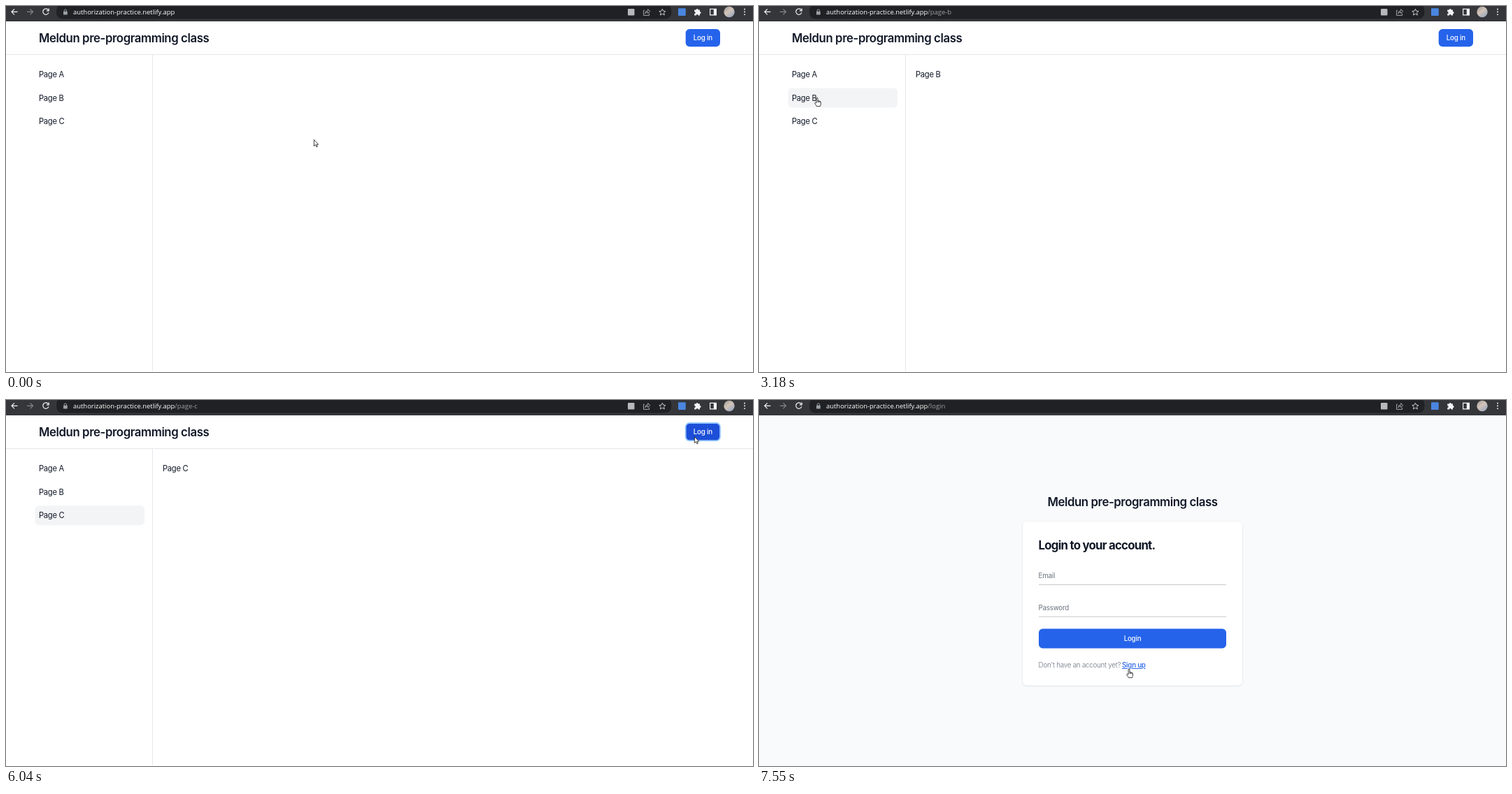
Write an HTML page that moves like this. It is 1068 px wide and 524 px high and loops after 8000 ms.

```html
<!DOCTYPE html>
<html lang="en">
<head>
<meta charset="utf-8">
<title>Login demo</title>
<style>
  html, body { margin: 0; width: 100%; height: 100%; overflow: hidden; background: #fff; }
  svg { display: block; width: 100vw; height: 100vh; }
  text { font: 9.8px Inter, sans-serif; font-optical-sizing: none; letter-spacing: -.025em; fill: #111827; }
  .url { font: 9.45px "Open Sans", sans-serif; letter-spacing: 0; fill: #fff; }
  .title { font-size: 16.8px; font-weight: 600; }
  .head { font-size: 16.8px; font-weight: 700; letter-spacing: -.045em; }
  .page { font-size: 11.2px; }
  .label { font-weight: 500; fill: #fff; text-anchor: middle; }
  .soft { fill: #6b7280; }
  .link { font-weight: 500; fill: #2563eb; }
  .icons { fill: none; stroke: #f1f3f4; stroke-width: 1.2; }
</style>
</head>
<body>
<svg viewBox="0 0 1068 524">
  <defs>
    <linearGradient id="photo" x1="0" y1="0" x2=".7" y2="1">
      <stop offset="0" stop-color="#9a9694"/>
      <stop offset=".5" stop-color="#d3c4b8"/>
      <stop offset="1" stop-color="#9da9c0"/>
    </linearGradient>
    <filter id="shadow" x="-5%" y="-5%" width="110%" height="112%">
      <feDropShadow dx="0" dy=".7" stdDeviation=".9" flood-opacity=".15"/>
    </filter>
  </defs>

  <g id="home">
    <rect width="1068" height="524" fill="#fff"/>
    <path d="M0 69.5H1068M209.5 70V523" stroke="#e5e7eb"/>
    <text class="title" x="47" y="52">Meldun pre-programming class</text>
    <g id="menu"></g>
    <text class="page" id="content" x="224" y="102"></text>
    <rect id="login" x="971.7" y="33" width="49.3" height="25.2" rx="5.6"/>
    <text class="label" x="996.3" y="49.2">Log in</text>
  </g>

  <g id="form">
    <rect width="1068" height="524" fill="#f8fafc"/>
    <text class="title" x="534" y="152.4" text-anchor="middle">Meldun pre-programming class</text>
    <rect x="377.2" y="174.3" width="313.6" height="234.2" rx="5.6" fill="#fff" filter="url(#shadow)"/>
    <text class="head" x="399.6" y="214">Login to your account.</text>
    <text class="soft" x="399.6" y="254.8">Email</text>
    <text class="soft" x="399.6" y="300.8">Password</text>
    <path d="M400 264.4H668M400 310.2H668" stroke="#c6c8cc"/>
    <rect id="submit" x="400" y="327.5" width="268" height="28" rx="5.6"/>
    <text class="label" x="534" y="345">Login</text>
    <text class="soft" x="399.6" y="383" style="font-weight:300">Don't have an account yet?</text>
    <text class="link" id="signup" x="519" y="383">Sign up</text>
  </g>

  <rect width="1068" height="22" fill="#35363a"/>
  <path d="M74 0H949.5Q951.5 4 951.5 8.5Q951.5 18.5 941 18.5H82Q72 18.5 72 8.5Q72 4 74 0Z" fill="#202124"/>
  <text class="url" x="96" y="12.3">authorization-practice.netlify.app<tspan id="path" fill="#9aa0a6"></tspan></text>
  <g class="icons">
    <path d="M16.5 8.3H8M12 4.3L8 8.3L12 12.3"/>
    <path d="M30 8.3H38.5M34.5 4.3L38.5 8.3L34.5 12.3" stroke="#85878a"/>
    <path d="M60.4 5.6A4.2 4.2 0 1 0 61 9.4M61.2 3.6V6.8H58"/>
    <path d="M83.2 8V6.6A1.7 1.7 0 0 1 86.6 6.6V8" stroke="#9aa0a6" stroke-width="1"/>
    <rect x="82" y="7.7" width="5.8" height="4.8" rx=".6" fill="#9aa0a6" stroke="none"/>
    <rect x="889" y="4" width="9.5" height="9.5" rx="1" fill="#b5b8bc" stroke="none"/>
    <path d="M913 6.3H911.6V13.4H919.6V11M913.8 10.6Q914.2 6.9 917.8 6.7V4.6L920.8 7.7L917.8 10.6V8.8Q915.4 8.7 913.8 10.6Z" stroke="#b5b8bc" stroke-width=".9"/>
    <path d="M938.4 4.2L939.8 7.2L943 7.5L940.6 9.7L941.3 13L938.4 11.3L935.5 13L936.2 9.7L933.8 7.5L937 7.2Z" stroke="#d5d7da" stroke-width=".9"/>
    <rect x="961" y="3.3" width="10.8" height="10.8" rx="1" fill="#4a86e0" stroke="none"/>
    <path d="M984.2 5.6H986.6A1.6 1.6 0 1 1 989.8 5.6H992V8A1.6 1.6 0 1 1 992 11.2V13.4H989.8A1.5 1.5 0 0 0 986.8 13.4H984.2V11A1.5 1.5 0 0 0 984.2 8Z" fill="#f1f3f4" stroke="none"/>
    <path d="M1006.6 4.4H1015.4V12.8H1006.6Z"/>
    <path d="M1011.8 4H1016V13.2H1011.8Z" fill="#f1f3f4" stroke="none"/>
    <circle cx="1034" cy="8.5" r="7.7" fill="url(#photo)" stroke="none"/>
    <path d="M1056 3.8V5.4M1056 7.6V9.2M1056 11.4V13" stroke-width="1.7"/>
  </g>

  <g id="cursor" fill="#fff" stroke="#111" stroke-width=".8" stroke-linejoin="round">
    <path id="arrow" d="M.4 .5V9.6L2.5 7.7L3.9 10.8L5.3 10.2L3.9 7.2H6.7Z"/>
    <path id="hand" d="M-1 8V1.2Q-1 .3 0 .3T1 1.2V4.6Q2.2 4 2.6 5Q3.8 4.6 4 5.6Q5.4 5.4 5.4 6.8V9Q5.4 11 4.4 12.6H-.6Q-1.6 10.6 -3 8.8Q-3.6 7.6 -2.6 7.2Q-1.8 7 -1 8ZM1 4.6V7M2.6 5V7M4 5.6V7"/>
  </g>
</svg>
<script>
const $ = id => document.getElementById(id);
const LOOP = 8000, ROW = 33.6;
const BLUE = '#2563eb', DARK = '#1d4ed8';
const letters = ['A', 'B', 'C'];

// Pointer moves: start, end, number of steps, target x, target y
const moves = [
  [500, 840, 6, 48, 79],
  [1240, 1380, 3, 67, 91],
  [2110, 2380, 5, 72, 121],
  [3180, 3180, 1, 83, 131],
  [3250, 3520, 5, 95, 161],
  [4250, 4250, 1, 144, 149],
  [4320, 4870, 8, 837, 23],
  [5130, 5620, 8, 984, 52],
  [6440, 6920, 8, 525, 278],
  [7220, 7280, 2, 527, 332],
  [7350, 7550, 4, 529, 385]
];
// Time of each click and the page it opens
const visits = [[1860, 'A'], [2780, 'B'], [3930, 'C']];
const FOCUS = 5900, LOADING = 6030, FORM = 6110;

$('menu').innerHTML = letters.map((c, i) =>
  `<rect id="row${c}" x="41.5" y="${84 + ROW * i}" width="156.5" height="28" rx="5.6" fill="#f3f4f6"/>
   <text class="page" x="47" y="${102 + ROW * i}">Page ${c}</text>`).join('');

const show = (id, on) => $(id).style.display = on ? '' : 'none';
const smooth = p => p * p * (3 - 2 * p);

function pointer(t) {
  let x = 440, y = 191;
  for (const [start, end, n, tx, ty] of moves) {
    if (t < start) break;
    const step = t >= end ? n : 1 + Math.floor((t - start) / (end - start) * (n - 1));
    const p = smooth(step / n);
    x += (tx - x) * p;
    y += (ty - y) * p;
  }
  return [x, y];
}

function draw(t) {
  const [x, y] = pointer(t);
  const over = (l, top, w, h) => x >= l && x <= l + w && y >= top && y <= top + h;
  const form = t >= FORM;
  const page = visits.reduce((now, [at, c]) => t >= at ? c : now, '');
  show('home', !form);
  show('form', form);

  let hit = false;
  letters.forEach((c, i) => {
    const on = !form && over(41.5, 84 + ROW * i, 156.5, 28);
    hit = hit || on;
    show('row' + c, on || page === c);
  });
  const onLogin = !form && over(971.7, 33, 49.3, 25.2);
  const onSubmit = form && over(400, 327.5, 268, 28);
  const onSignup = form && over(519, 373, 33, 14);

  $('content').textContent = page && 'Page ' + page;
  $('path').textContent = form ? '/login' : page && '/page-' + page.toLowerCase();
  $('login').setAttribute('fill', onLogin ? DARK : BLUE);
  $('login').setAttribute('stroke', t >= FOCUS ? '#93c5fd' : 'none');
  $('login').setAttribute('stroke-width', 1.8);
  $('submit').setAttribute('fill', onSubmit && t >= 7340 ? DARK : BLUE);
  $('signup').setAttribute('text-decoration', onSignup ? 'underline' : 'none');

  const hand = hit || onLogin && t < LOADING || onSubmit || onSignup;
  show('hand', hand);
  show('arrow', !hand);
  $('cursor').setAttribute('transform', `translate(${x} ${y})`);
}

const begin = performance.now();
function tick() {
  draw((performance.now() - begin) % LOOP);
  requestAnimationFrame(tick);
}
tick();
</script>
</body>
</html>
```
